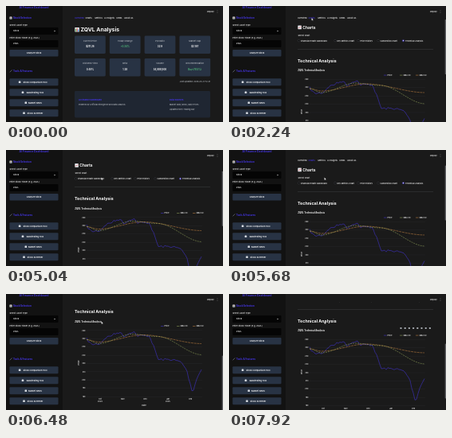
An HTML page for the animation above (8 s loop, 272 by 146 pixels).

```html
<!DOCTYPE html>
<html lang="en">
<head>
<meta charset="utf-8">
<title>Stock dashboard</title>
<style>
html, body { margin: 0; width: 100%; height: 100%; overflow: hidden; background: #1a1a1a; }
svg { display: block; width: 100vw; height: 100vh; font-family: Inter, "Open Sans", sans-serif; font-weight: 500; }
.line { fill: none; stroke-width: .5; stroke-linejoin: round; }
</style>
</head>
<body>
<svg id="stage" viewBox="0 0 272 146"></svg>
<script>
const BLUE = '#4636e8', ORANGE = '#d08a45', GREEN = '#9fb060';
const WHITE = '#fafafa', GRAY = '#b4b8be', BUTTON = '#283344', FIELD = '#050505';
const TICKER = 'ZQVL';

// y is the vertical centre of the text
const text = (x, y, s, size = 2.7, fill = WHITE, extra = '') =>
  `<text x="${x}" y="${y + size * .36}" font-size="${size}" fill="${fill}" ${extra}>${s}</text>`;
const bold = (x, y, s, size, fill) => text(x, y, s, size, fill, 'font-weight="700"');
const mid = (x, y, s, size, fill, weight = 500) =>
  text(x, y, s, size, fill, `text-anchor="middle" font-weight="${weight}"`);
const rect = (x, y, w, h, fill, r = 0, extra = '') =>
  `<rect x="${x}" y="${y}" width="${w}" height="${h}" rx="${r}" fill="${fill}" ${extra}/>`;
const dot = (x, y, r, fill, extra = '') => `<circle cx="${x}" cy="${y}" r="${r}" fill="${fill}" ${extra}/>`;
const path = (points, color, extra = '') =>
  `<polyline class="line" points="${points}" stroke="${color}" ${extra}/>`;

const barIcon = (x, y, s) => rect(x, y, s, s, '#e4e8ec', s * .1) +
  ['#4caf50', '#e05555', '#3f8fe0'].map((c, i) =>
    rect(x + s * (.14 + i * .26), y + s * [.3, .15, .45][i], s * .2, s * [.6, .75, .45][i], c)).join('');
const trendIcon = (x, y, s) => rect(x, y, s, s, '#e4e8ec', s * .1) +
  path([[x + s * .1, y + s * .8], [x + s * .4, y + s * .45], [x + s * .6, y + s * .6], [x + s * .9, y + s * .15]], '#d94444');

// keys: [position, value]; eased or straight between neighbours
const smooth = p => p * p * (3 - 2 * p), linear = p => p;
function at(keys, t, ease = smooth) {
  const i = keys.findIndex(k => k[0] > t);
  if (i < 0) return keys[keys.length - 1][1];
  if (!i) return keys[0][1];
  const [t0, a] = keys[i - 1], [t1, b] = keys[i];
  return a + (b - a) * ease((t - t0) / (t1 - t0));
}

let seed = 7;
const noise = size => ((seed = seed * 16807 % 2147483647) / 2147483647 - .5) * size;
const curve = (keys, ease, jitter = 0) =>
  Array.from({ length: 73 }, (_, i) => [101 + i * 2, at(keys, 101 + i * 2, ease) + noise(jitter)]);

function sidebar() {
  const tools = ['Stock Comparison Tool', 'Backtesting Tool', 'Market News', 'Stock Screener'];
  return rect(0, 0, 71, 146, '#121212') +
    mid(35, 1.8, 'AI Finance Dashboard', 3.5, BLUE, 600) +
    barIcon(4.5, 13.5, 3) + bold(9, 15, 'Stock Selection', 3, BLUE) +
    text(4.5, 24, 'Select Asset Type', 2.6) +
    rect(4.5, 27, 61, 9, FIELD, 1) + text(9, 31.5, 'Stock') +
    path([[60, 31], [61, 32], [62, 31]], WHITE) +
    text(4.5, 40, `Enter Stock Ticker (e.g. ${TICKER})`, 2.6) +
    rect(4.5, 43, 61, 9, FIELD, 1) + text(9, 47.5, TICKER) +
    rect(4.5, 55, 61, 8.5, BUTTON, 1) + mid(35, 59.2, 'Analyze Stock', 2.7, WHITE, 600) +
    path([[4.7, 83.3], [7.5, 80.5]], '#9aa5b2') + bold(9, 82, 'Tools &amp; Features', 3, BLUE) +
    tools.map((s, i) => {
      const y = 91.3 + 13 * i;
      return rect(4.5, y, 61, 9, BUTTON, 1) + rect(32 - s.length * .77, y + 3.2, 2.6, 2.6, '#d5d9df', .4) +
        mid(36.5, y + 4.5, s, 2.7, WHITE, 600);
    }).join('');
}

const TABS = [['Overview', 86], ['Charts', 99.5], ['Metrics', 111.5], ['AI Insights', 123], ['News', 138.5], ['About Us', 148]];
const tabs = active => TABS.map(([s, x], i) =>
  text(x, 15, s, 2.6, i === active ? BLUE : WHITE, `class="tab${i}"`)).join('');

function overview() {
  const cards = [
    ['Current Price', '$211.26'], ['Today Change', '+0.34%', '#50b878'], ['P/E Ratio', '32.9'], ['Market Cap', '$3.16T'],
    ['Dividend Yield', '0.49%'], ['Beta', '1.28'], ['Volume', '54,088,900'], ['Recommendation', 'Buy (78.5%)', '#50b878']];
  return tabs(0) + barIcon(86.3, 27, 5.6) + bold(93.5, 30, `${TICKER} Analysis`, 6.8) +
    cards.map(([label, value, color], i) => {
      const x = 86 + i % 4 * 43.8, y = i < 4 ? 37.5 : 66;
      return rect(x, y, 38.8, 22.5, BUTTON, 1.4) +
        mid(x + 19.4, y + 6.3, label, 2.7, GRAY) + mid(x + 19.4, y + 13.7, value, 2.8, color, 700);
    }).join('') +
    text(256, 95.2, 'Last Updated: 2025-05-17 13:31', 2.5, GRAY, 'text-anchor="end" font-style="italic"') +
    rect(86, 107, 170, 33.5, '#1f2632', 1.4) +
    bold(91, 118, 'AI Finance Dashboard', 2.7, BLUE) +
    text(91, 124, 'Powered by Artificial Intelligence and Data Analysis', 2.4, GRAY) +
    bold(205, 118, 'Data Sources', 2.7, BLUE) +
    text(205, 124, 'Market Data, News, Daily Prices', 2.4, GRAY) +
    text(205, 129.7, 'Updated Every Trading Day', 2.4, GRAY);
}

const PRICE = [[101, 103], [107, 110], [118, 109], [124, 102], [143, 94], [147, 100], [160, 93], [164, 99],
  [180, 99], [191, 129], [208, 129], [219, 132], [226, 141], [234, 171], [238, 156], [246, 138]];
const FAST = [[101, 104], [116, 109], [158, 97], [190, 100], [246, 123]];
const SLOW = [[101, 104], [116, 107], [172, 98], [246, 109]];

function charts() {
  const options = [['Financial Health Dashboard', 87.5], ['Key Metrics Chart', 133], ['Price History', 162],
    ['Candlestick Chart', 187], ['Technical Analysis', 218.5]];
  const legend = [['Price', BLUE], ['SMA 20', GREEN], ['SMA 50', ORANGE]];
  const grid = Array.from({ length: 9 }, (_, i) => {
    const y = 92.3 + i * 10.4;
    return rect(101, y, 145, .2, '#34373c') + text(99.5, y, 260 - i * 10, 2.2, WHITE, 'text-anchor="end"');
  });
  const months = ['Oct', 'Nov', 'Dec', 'Jan', 'Feb'].map((s, i) => {
    const x = 118 + 28.3 * i;
    return mid(x, 179, s, 2.3) + (i % 3 ? '' : mid(x, 182, i ? 2025 : 2024, 2.3));
  });
  const tools = Array.from({ length: 8 }, (_, i) => rect(214.5 + i * 5.2, 77, 2, 2, '#a9adb3', .6));
  return tabs(1) + trendIcon(86.3, 24.6, 4.6) + bold(92.3, 27, 'Charts', 4.9) + text(86.5, 36.7, 'Select Chart', 2.5) +
    options.map(([s, x], i) => dot(x, 43.6, 1.2, i < 4 ? FIELD : BLUE, 'stroke="#6a6e78" stroke-width=".3"') +
      (i < 4 ? '' : dot(x, 43.6, .5, WHITE)) + text(x + 2.5, 43.6, s, 2.5)).join('') +
    rect(86, 54, 170, .4, '#45474b') + bold(86, 69, 'Technical Analysis', 5.3) +
    bold(86.2, 81.3, `${TICKER} Technical Analysis`, 2.8) +
    legend.map(([s, c], i) => rect(194 + i * 20, 86.8, 3.5, .5, c) + text(198.5 + i * 20, 87, s, 2.4)).join('') +
    grid.join('') + months.join('') + mid(173, 187, 'Date', 2.5) +
    text(91, 133, 'Price', 2.5, WHITE, 'text-anchor="middle" transform="rotate(-90 91 133)"') +
    path(curve(PRICE, linear, 3), BLUE) + path(curve(SLOW), ORANGE, 'stroke-dasharray="3 .8"') +
    path(curve(FAST), GREEN, 'stroke-dasharray="2 1"') +
    `<g id="modebar">${tools.join('')}</g>`;
}

const stage = document.getElementById('stage');
stage.innerHTML = `<defs><clipPath id="view">${rect(71, 10, 201, 136, '#000')}</clipPath></defs>` +
  rect(0, 0, 272, 146, '#1a1a1a') +
  `<g clip-path="url(#view)"><g id="overview">${overview()}</g><g id="charts">${charts()}</g></g>` +
  sidebar() + text(252, 7, 'Deploy', 2.6) +
  [5.8, 7, 8.2].map(y => dot(265, y, .25, WHITE)).join('') +
  rect(270.8, 13, 1, 69, '#75777a', .5, 'id="bar"') +
  '<path id="cursor" d="M0 0V3.2L.8 2.5 1.4 3.7 1.9 3.4 1.4 2.3H2.4Z" fill="#fff" stroke="#111" stroke-width=".2"/>';

const [overviewEl, chartsEl, modebar, bar, cursor] =
  ['overview', 'charts', 'modebar', 'bar', 'cursor'].map(id => document.getElementById(id));
const show = (el, on) => el.style.display = on ? '' : 'none';

const SCROLL = [[4720, 0], [5040, 7.5], [5280, 10], [5680, 2], [6480, 46.5], [7360, 40], [7920, 35]];
const CURSOR_X = [[480, 98], [880, 103.5], [3360, 103.5], [3680, 115], [4320, 115], [4560, 119.5]];
const CURSOR_Y = [[4320, 15], [4560, 34.5]];

function draw() {
  const t = Math.floor((performance.now() - start) % 8000 / 80) * 80;
  const onCharts = t >= 1920, y = at(SCROLL, t);
  show(overviewEl, !onCharts);
  show(chartsEl, onCharts);
  show(bar, onCharts);
  show(modebar, t >= 7440);
  show(cursor, t >= 560);
  chartsEl.setAttribute('transform', `translate(0 ${-y})`);
  bar.setAttribute('y', 17 + y * 1.3);
  overviewEl.querySelector('.tab1').setAttribute('fill', t >= 720 ? BLUE : WHITE);
  chartsEl.querySelector('.tab2').setAttribute('fill', t >= 3600 && t < 4480 ? BLUE : WHITE);
  cursor.setAttribute('transform', `translate(${at(CURSOR_X, t)} ${at(CURSOR_Y, t)})`);
  requestAnimationFrame(draw);
}
const start = performance.now();
draw();
</script>
</body>
</html>
```
